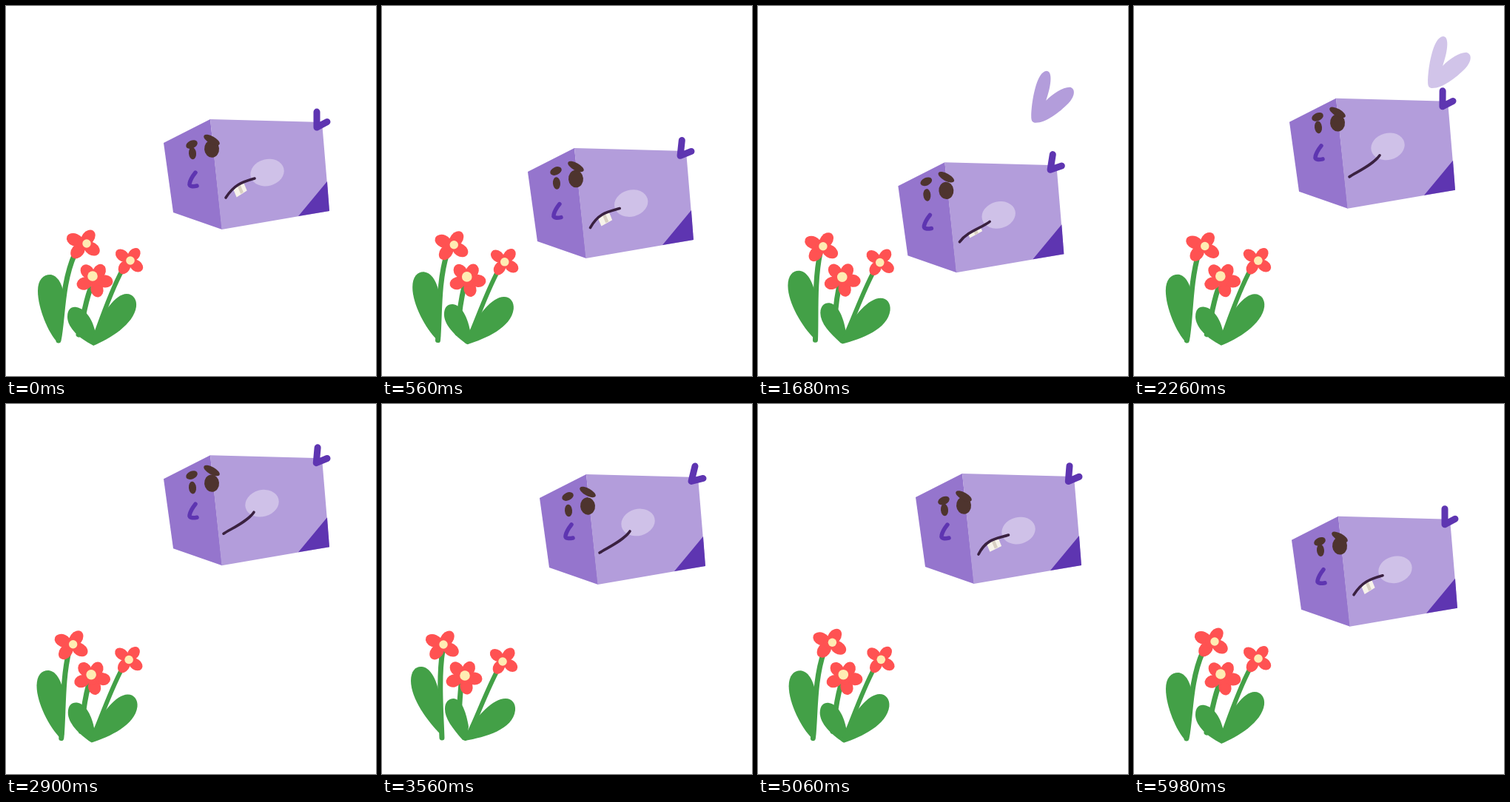
Write an HTML page with a canvas that moves like this. It is 500 px wide and 500 px high and loops after 6 s.

```html
<!DOCTYPE html>
<html>
<head>
<meta charset="utf-8">
<style>
html, body { margin: 0; width: 100%; height: 100%; overflow: hidden; background: #fff; }
canvas { display: block; }
</style>
</head>
<body>
<canvas id="stage" width="500" height="500"></canvas>
<script>
const LOOP = 6000;
const c = document.getElementById('stage').getContext('2d');
const GREEN = '#43a047', RED = '#ff5252', CREAM = '#ffecb3';
const LILAC = '#b39ddb', VIOLET = '#9575cd', DEEP = '#5e35b1', PALE = '#cfc1e8', BROWN = '#4e342e';

const lerp = (a, b, k) => a + (b - a) * k;
const mix = (a, b, k) => a.map((v, i) => lerp(v, b[i], k));
const clamp = v => Math.max(0, Math.min(1, v));

// Smooth looping curve through [time, value] keys that never overshoots.
function track(keys) {
  const n = keys.length;
  const at = i => {
    const turn = Math.floor(i / n), [t, v] = keys[i - turn * n];
    return [t + turn * LOOP, v];
  };
  const secant = i => (at(i + 1)[1] - at(i)[1]) / (at(i + 1)[0] - at(i)[0]);
  const slope = i => {
    const a = secant(i - 1), b = secant(i);
    return a * b > 0 ? 2 * a * b / (a + b) : 0;
  };
  return t => {
    let i = 0;
    while (at(i + 1)[0] <= t) i++;
    const [t0, v0] = at(i), [t1, v1] = at(i + 1);
    const d = t1 - t0, u = (t - t0) / d, e = u * u * (3 - 2 * u);
    return lerp(v0, v1, e) + d * u * (1 - u) * (slope(i) * (1 - u) - slope(i + 1) * u);
  };
}

// Blend two path strings that share the same commands.
function blend(a, b, k) {
  const to = b.match(/-?[\d.]+/g);
  let i = 0;
  return a.replace(/-?[\d.]+/g, v => lerp(+v, +to[i++], k).toFixed(2));
}

function fill(path, color) {
  c.fillStyle = color;
  c.fill(new Path2D(path));
}

function stroke(path, color, width) {
  c.strokeStyle = color;
  c.lineWidth = width;
  c.lineCap = c.lineJoin = 'round';
  c.stroke(new Path2D(path));
}

function oval(x, y, rx, ry, deg, color) {
  c.fillStyle = color;
  c.beginPath();
  c.ellipse(x, y, rx, ry, deg * Math.PI / 180, 0, 7);
  c.fill();
}

const sway = track([[0, 1], [1200, 0], [2400, 1], [3600, 0]]);
const lean = track([[0, 1], [1200, 0], [2350, .5], [3600, 0], [4620, .47], [5060, .67]]);
const bodyX = track([[0, 0], [1120, -32], [1300, -32], [2260, -3], [2480, 0]]);
const bodyY = track([[0, 153], [620, 196], [1120, 228], [1350, 233], [2260, 125], [2720, 46],
  [3100, 96], [3560, 95], [3720, 92], [4340, 82.5], [4500, 77], [4620, 79], [4960, 87],
  [5060, 94], [5580, 127]]);

// Mouth curve (8), blush centre (2), tooth length
const FROWN = [297, 259, 308, 242, 318, 238, 336, 233, 353, 225, 12.5];
const GRIT = [298, 262, 309, 240, 324, 241, 338.5, 236, 352, 230, 12];
const SMIRK = [294, 259, 305, 252, 327, 242, 335, 230, 346, 218, 0];

// Eye shift, brow height, nose height, then the mouth pose
const poses = [
  [0, [-3, 187, 225, ...FROWN]],
  [1120, [0, 181, 231, ...GRIT]],
  [2260, [-10, 178, 217, ...SMIRK]],
  [3560, [0, 183, 221, ...SMIRK]],
  [4620, [0, 187, 219, ...mix(SMIRK, GRIT, .42)]],
  [5060, [0, 189.5, 222, ...GRIT]]
];
const face = poses[0][1].map((_, i) => track(poses.map(([t, p]) => [t, p[i]])));

function bloom(x, y, petals, rx, ry, yolkX, yolkY, r) {
  for (const [px, py] of petals)
    oval(x + px, y + py, rx, ry, Math.atan2(py, px) * 180 / Math.PI, RED);
  oval(x, y, rx * .8, rx * .8, 0, RED);
  oval(x + yolkX, y + yolkY, r, r, 0, CREAM);
}

function flowers(t) {
  const s = sway(t), h = lean(t);
  const stem1 = blend('M81,451C80,420 76,370 ', 'M71,452C77,425 75,375 ', s) + blend('82,333', '93,335', h);
  stroke(stem1, GREEN, 7);
  stroke(blend('M107,440C103,420 105,400 107,378', 'M98,444C104,430 104,410 114,382', s), GREEN, 7);
  stroke(blend('M116,448C128,425 140,390 157,358', 'M122,442C130,420 142,385 157,357', s), GREEN, 6);
  fill(blend('M80,447C62,430 39,398 39,374C39,360 46,354 54,355C68,357 76,378 79,402L84,447Z',
    'M70,455C57,442 43,408 43,385C43,370 50,363 60,363C70,364 77,377 78,392L75,447Z', s), GREEN);
  fill(blend('M109,454C95,438 85,425 85,412C85,402 91,398 97,398C108,399 114,418 117,436L114,455Z',
    'M117,458C100,450 83,435 83,420C83,410 88,406 95,407C108,409 118,425 121,443L120,458Z', s), GREEN);
  fill(blend('M118,440C128,422 150,398 167,398C176,398 181,405 180,414C177,440 140,450 112,455L109,453Z',
    'M120,440C130,415 148,389 163,389C172,389 177,397 176,406C173,430 140,450 118,459L114,456Z', s), GREEN);

  bloom(lerp(82, 105, h), lerp(325, 321, h) + 3 * clamp(s - h),
    [[-12, -5], [6, -8], [11, 7], [-8, 10]], 11.5, 8.5, lerp(1, 4, h), 0, 5.7);
  bloom(lerp(111, 120, s), lerp(370, 371, s),
    [[-10, -12], [6, -12], [-14, 4], [3, 12], [14, 1]], 10.5, 8.5, lerp(1, -3, s), lerp(-3, -6, s), 6.8);
  bloom(lerp(164, 166, s), lerp(346.5, 344, s),
    [[-9, -7], [7, -8], [10, 7], [-6, 9]], 10, 7.5, lerp(-1, 2, s), lerp(1.5, 0, s), 5.8);
}

function heart(t) {
  if (t < 700 || t > 2500) return;
  // Steady rise, then an even slow-down to a stop at 2260.
  const brake = Math.min(400, Math.max(0, t - 1860));
  const run = Math.min(t, 1860) - 1120 + brake - brake * brake / 800;
  c.save();
  c.globalAlpha = clamp((2500 - t) / 400);
  c.translate(run * .0735, run * -.1235);
  fill('M328,219C328,200 335,157 349,157C358,158 354,180 348,197C358,187 372,178 381,179' +
    'C389,182 386,193 378,201C366,213 348,227 334,227C330,227 328,225 328,219Z', LILAC);
  c.restore();
}

function mouth(m, tooth) {
  const at = u => [0, 1].map(i => {
    const v = 1 - u;
    return v * v * v * m[i] + 3 * v * v * u * m[i + 2] + 3 * v * u * u * m[i + 4] + u * u * u * m[i + 6];
  });
  const drop = ([x, y]) => [x + tooth * .38, y + tooth * .92];
  const slab = (a, b, color) =>
    fill(`M${at(a)}L${at((a + b) / 2)}L${at(b)}L${drop(at(b))}L${drop(at(a))}Z`, color);
  if (tooth > .5) {
    slab(.3, .68, '#f7f3ea');
    slab(.46, .56, '#d9d0c3');
  }
  stroke(`M${m[0]},${m[1]}C${m.slice(2, 8)}`, '#3a2140', 3.6);
}

function box(t) {
  const s = sway(t);
  const [eye, brow, nose, ...rest] = face.map(f => f(t));
  c.save();
  c.translate(bodyX(t), bodyY(t) - 153);
  fill('M213,185L276,153L292,302L226,279Z', VIOLET);
  fill('M276,153L427,157L437,277L291.5,302Z', LILAC);
  fill('M434,237L437,277L395,284Z', DEEP);
  stroke(blend('M423,142L418,162.5L434,158.5', 'M420,143L420,164L434,156.5', s), DEEP, 9);

  oval(rest[8], rest[9], 23, 18, -15, PALE);
  oval(252, 202 + eye, 5, 8.3, -5, BROWN);
  oval(278, 196 + eye, 10, 11.7, -5, BROWN);
  oval(251, brow, 8.2, 5.3, -24, BROWN);
  oval(278, brow - 6, 12, 5, 29, BROWN);
  c.save();
  c.translate(0, nose - 225);
  stroke('M256,225C252,230 249,235 248,240C247,244 253,244 258,243', DEEP, 5.5);
  c.restore();
  mouth(rest, rest[10]);
  c.restore();
}

function draw(now) {
  const t = now % LOOP;
  c.clearRect(0, 0, 500, 500);
  flowers(t);
  heart(t);
  box(t);
  requestAnimationFrame(() => draw(performance.now() - start));
}

const start = performance.now();
draw(0);
</script>
</body>
</html>
```
